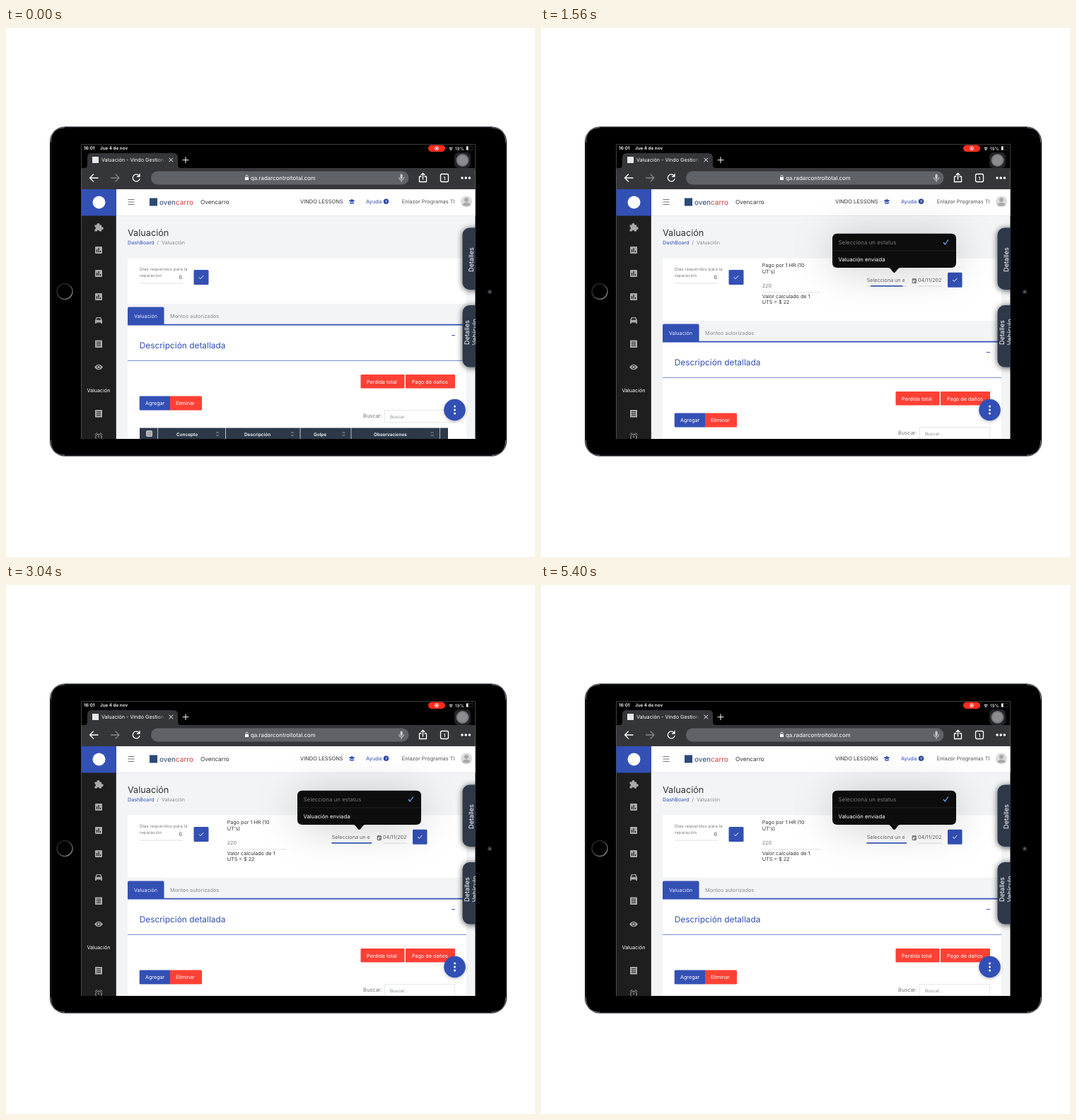
Animation of 748 by 748 pixels, one loop 5480 ms. Source, as an HTML page:

```html
<!DOCTYPE html>
<html lang="es">
<head>
<meta charset="utf-8">
<title>Valuación</title>
<style>
html, body { margin: 0; width: 100%; height: 100%; overflow: hidden; background: #fff; }
svg { display: block; width: 100vw; height: 100vh; }
text {
  font-family: Inter, "Liberation Sans", sans-serif;
  font-size: 7.2px; fill: #333; text-rendering: geometricPrecision; white-space: pre;
}
.b { font-weight: 600; }
.w { fill: #fff; }
.mute { fill: #8a8d92; }
.blue { fill: #3350b5; }
.red { fill: #ff4034; }
.small { font-size: 5.9px; letter-spacing: .15px; fill: #777; }
.th { font-size: 6.4px; font-weight: 600; fill: #fff; }
.nav { font-size: 7.5px; }
.rule { stroke: #d5d7da; stroke-width: .8; }
.ln { fill: none; stroke: #fff; stroke-width: 1.3; stroke-linecap: round; stroke-linejoin: round; }
.thin { stroke-width: 1; }

/* One loop: fields load at 320 ms, the menu opens at 1400 ms */
.low, .extra, .pop, .focus { animation: 5.48s linear infinite; }
.low { animation-name: push; animation-timing-function: step-end; }
.extra { animation-name: load; animation-timing-function: step-end; }
.pop { animation-name: open; }
.focus { animation-name: grow; transform-origin: 488.7px 365px; }
@keyframes push { 0% { transform: none; } 5.84%, 100% { transform: translateY(24px); } }
@keyframes load { 0% { opacity: 0; } 5.84%, 100% { opacity: 1; } }
@keyframes open { 0%, 25.55% { opacity: 0; } 27.5%, 100% { opacity: 1; } }
@keyframes grow {
  0%, 24.8% { transform: scaleX(0); animation-timing-function: ease-out; }
  30.8%, 100% { transform: scaleX(1); }
}
</style>
</head>
<body>
<svg viewBox="0 0 748 748">
  <defs>
    <clipPath id="screen"><rect x="106.5" y="164.5" width="557" height="416.5"/></clipPath>
    <clipPath id="tabText"><rect x="134" y="178" width="91" height="18"/></clipPath>
    <clipPath id="dateText"><rect x="532" y="348" width="35" height="16"/></clipPath>
    <linearGradient id="tabFade">
      <stop offset="0" stop-color="#35363a" stop-opacity="0"/>
      <stop offset="1" stop-color="#35363a"/>
    </linearGradient>
    <linearGradient id="ring" x1="0" y1="0" x2="1" y2="1">
      <stop offset="0" stop-color="#222"/><stop offset=".5" stop-color="#444"/>
      <stop offset="1" stop-color="#aaa"/>
    </linearGradient>
    <filter id="soft" x="-70%" y="-220%" width="240%" height="540%">
      <feDropShadow dx="0" dy="4" stdDeviation="28" flood-color="#000" flood-opacity=".2"/>
    </filter>
    <filter id="near" x="-80%" y="-30%" width="260%" height="160%">
      <feDropShadow dx="0" dy="1" stdDeviation="4" flood-color="#000" flood-opacity=".7"/>
    </filter>
    <filter id="lift" x="-50%" y="-50%" width="200%" height="200%">
      <feDropShadow dx="0" dy="1.5" stdDeviation="2" flood-color="#000" flood-opacity=".25"/>
    </filter>
    <g id="bars">
      <rect x="-5" y="-5" width="10" height="10" rx="1" fill="#aaa"/>
      <path d="M-2.5 3V-1M0 3V-3M2.5 3V1" stroke="#1e1e1e" stroke-width="1.2"/>
    </g>
    <g id="list">
      <rect x="-5" y="-5" width="10" height="10.5" fill="#aaa"/>
      <path d="M-3-2.3H3M-3 .2H3M-3 2.7H3" stroke="#1e1e1e" stroke-width="1"/>
    </g>
    <path id="tick" d="M-3 0L-1 2.2L3.2-2.3" fill="none" stroke="#fff" stroke-width="1"/>
    <path id="sort" d="M-1.7-1L0-3L1.7-1M-1.7 1L0 3L1.7 1" fill="none" stroke="#9aa4b2" stroke-width=".9"/>
  </defs>

  <!-- Tablet -->
  <rect x="62" y="139.5" width="646" height="466" rx="21" fill="#000"/>
  <rect x="63.3" y="140.8" width="643.4" height="463.4" rx="20" fill="none" stroke="#20242c" stroke-width="1"/>
  <path d="M63.3 162Q63.3 140.8 83 140.8M687 140.8Q706.7 140.8 706.7 162M63.3 583Q63.3 604.2 83 604.2M687 604.2Q706.7 604.2 706.7 583" fill="none" stroke="#8f97a5" stroke-width=".9"/>
  <circle cx="83" cy="372.5" r="11" fill="#000" stroke="url(#ring)" stroke-width="1.2"/>
  <circle cx="684" cy="373" r="3" fill="#30343c"/>
  <circle cx="684" cy="373" r="1.2" fill="#59606d"/>

  <g clip-path="url(#screen)">
    <rect x="106" y="164" width="558" height="417" fill="#f2f4f6"/>

    <!-- Browser -->
    <rect x="106" y="164" width="558" height="36" fill="#000"/>
    <path d="M106 198H111Q115 198 115 193V183Q115 177 121 177H237Q243 177 243 183V193Q243 198 247 198H664V228H106Z" fill="#35363a"/>
    <text class="w b" x="110" y="172.3" style="font-size:6.3px">16:01</text>
    <text class="w b" x="133" y="172.3" style="font-size:6.3px">Jue 4 de nov</text>
    <rect x="597" y="165.5" width="24" height="9.5" rx="4.7" fill="#ff2c20"/>
    <circle cx="609" cy="170.2" r="2.6" fill="none" stroke="#fff" stroke-width=".8"/>
    <circle cx="609" cy="170.2" r="1.2" fill="#fff"/>
    <path class="ln thin" d="M626.7 169.8Q629 167.8 631.3 169.8M627.8 171.3Q629 170.3 630.2 171.3"/>
    <circle cx="629" cy="172.4" r=".7" fill="#fff"/>
    <text class="w" x="635" y="172.5" style="font-size:6.4px">19%</text>
    <rect x="650.5" y="167.5" width="10" height="5" rx="1.2" fill="none" stroke="#444" stroke-width=".6"/>
    <rect x="651" y="167.5" width="2.6" height="5" fill="#fff"/>
    <rect x="122" y="182" width="9" height="9" fill="#e8e8e8"/>
    <g clip-path="url(#tabText)"><text class="w" x="135" y="189.3">Valuación - Vindo Gestion</text></g>
    <rect x="213" y="179" width="13" height="16" fill="url(#tabFade)"/>
    <path class="ln thin" d="M230.8 184L235.8 189M235.8 184L230.8 189M250 186.7H258M254 182.7V190.7"/>
    <rect x="634" y="176" width="23" height="22" rx="6" fill="#24252a"/>
    <circle cx="645.5" cy="187" r="9" fill="#77777b"/>
    <circle cx="645.5" cy="187" r="7" fill="#8c8c90"/>
    <path class="ln" d="M130 212H118.5M123.5 207L118.5 212L123.5 217"/>
    <path class="ln" d="M148.5 212H160M155 207L160 212L155 217" style="stroke:#85868a"/>
    <path class="ln" d="M188.3 209A5 5 0 1 0 189 213.5M189 206.5V210H185.5"/>
    <rect x="205" y="202.5" width="364.5" height="19" rx="9.5" fill="#5f6368"/>
    <rect x="338" y="211" width="5" height="4" rx=".6" fill="#fff"/>
    <path class="ln" d="M339 211V209.7A1.5 1.5 0 0 1 342 209.7V211" style="stroke-width:.8"/>
    <text class="w" x="346" y="214.8" style="font-size:7.9px">qa.radarcontroltotal.com</text>
    <rect x="557.5" y="206.5" width="3.2" height="7" rx="1.6" fill="#c9cbce"/>
    <path class="ln thin" d="M555.5 211.5A3.6 3.6 0 0 0 562.7 211.5M559.1 215.2V217.5" style="stroke:#c9cbce"/>
    <path class="ln" d="M587 210H584.5V217.5H594.5V210H592M589.5 214V205.5M587 207.8L589.5 205.3L592 207.8"/>
    <rect class="ln" x="614.5" y="206.5" width="11" height="11" rx="2"/>
    <text class="w b" x="620" y="214.5" text-anchor="middle" style="font-size:6.6px">1</text>
    <g fill="#fff"><circle cx="645" cy="212" r="1.8"/><circle cx="650.2" cy="212" r="1.8"/><circle cx="655.4" cy="212" r="1.8"/></g>

    <!-- Page header -->
    <rect x="155" y="228" width="509" height="37" fill="#fff"/>
    <path d="M155 265.4H664" stroke="#e3e5e8" stroke-width=".8"/>
    <path d="M172.5 242.5H181.5M172.5 246H181.5M172.5 249.5H181.5" stroke="#666" stroke-width=".9"/>
    <rect x="203" y="240.5" width="11" height="11" fill="#2b4a78"/>
    <text x="217" y="249.6" style="font-size:10px;fill:#27406f">oven<tspan fill="#d33a3a">carro</tspan></text>
    <text x="275" y="248.6" style="font-size:8.2px">Ovencarro</text>
    <text class="nav" x="416" y="248.4">VINDO LESSONS</text>
    <path d="M484.5 244.2L489 242L493.5 244.2L489 246.4ZM486 246V248Q489 249.6 492 248V246L489 247.5Z" fill="#3350b5"/>
    <text class="nav blue" x="509" y="248.4">Ayuda</text>
    <circle cx="537.5" cy="245.3" r="3.7" fill="#2d479f"/>
    <text class="w b" x="537.5" y="247.5" text-anchor="middle" style="font-size:5.8px">?</text>
    <text x="634.5" y="248.4" text-anchor="end" style="font-size:7.4px;fill:#555">Enlazor Programas TI</text>
    <circle cx="651" cy="245.5" r="8" fill="#dcdcdc"/>
    <circle cx="651" cy="243" r="3" fill="#a9a9a9"/>
    <path d="M645.5 250.5Q646 246.7 651 246.7T656.5 250.5Q651 253 645.5 250.5" fill="#a9a9a9"/>

    <!-- Side menu -->
    <rect x="106" y="228" width="49.8" height="353" fill="#1e1e1e"/>
    <rect x="106" y="228" width="49.8" height="37.5" fill="#3350b5"/>
    <circle cx="131.5" cy="246.5" r="9" fill="#fff"/>
    <path d="M125.5 278.5H128.5A2 2 0 1 1 132.3 278.5H135V281.3A2 2 0 1 1 135 285V287.5H132.2A2 2 0 0 0 128.4 287.5H125.5V284.8A2 2 0 0 0 125.5 281Z" fill="#aaa"/>
    <use href="#bars" x="131" y="314"/><use href="#bars" x="131" y="347"/><use href="#bars" x="131" y="380"/>
    <path d="M126 418V413.5L127.8 409H134.2L136 413.5V418H134.2V416.5H127.8V418Z" fill="#aaa"/>
    <path d="M127.8 412.8L128.7 410.3H133.3L134.2 412.8Z" fill="#1e1e1e"/>
    <use href="#list" x="131" y="446.5"/>
    <path d="M125 479.5Q131 471.8 137 479.5Q131 487.2 125 479.5Z" fill="#aaa"/>
    <circle cx="131" cy="479.5" r="2.2" fill="none" stroke="#1e1e1e" stroke-width="1"/>
    <text class="w" x="131" y="515" text-anchor="middle">Valuación</text>
    <use href="#list" x="131" y="545"/>
    <circle class="ln thin" cx="131" cy="578.5" r="4.3" style="stroke:#aaa"/>
    <path class="ln thin" d="M126 574.7L128.5 572.7M136 574.7L133.5 572.7M131 576V579" style="stroke:#aaa"/>

    <!-- Summary panel -->
    <text x="172" y="293.5" style="font-size:12.7px">Valuación</text>
    <text class="blue" x="172" y="305.8">DashBoard</text>
    <text class="mute" x="213.5" y="305.8">/</text>
    <text class="mute" x="220" y="305.8">Valuación</text>
    <rect x="172" y="325.5" width="479" height="64.5" fill="#fff"/>

    <!-- Detail area, pushed down when the fields load -->
    <g class="low">
      <rect x="172" y="360" width="479" height="30" fill="#fff"/>
      <rect x="172" y="420" width="479" height="170" fill="#fff"/>
      <path d="M172 419.6H651" stroke="#3350b5" stroke-width="1.7"/>
      <path d="M172 396.5Q172 394.5 174 394.5H221.5Q223.5 394.5 223.5 396.5V420H172Z" fill="#3350b5"/>
      <text x="181" y="409.5" style="fill:#e3e8fa">Valuación</text>
      <text class="mute" x="232" y="409.7" style="font-size:7.4px">Montos autorizados</text>
      <path d="M630 434.6H635" stroke="#3350b5" stroke-width="1"/>
      <text class="blue" x="188.7" y="453" style="font-size:11.9px">Descripción detallada</text>
      <path d="M172 470.4H651" stroke="#8b9cd6" stroke-width="1.1"/>
      <rect class="red" x="501.5" y="490" width="62" height="19.5" rx="1.2"/>
      <rect class="red" x="565" y="490" width="70" height="19.5" rx="1.2"/>
      <text class="w" x="510" y="502.5">Perdida total</text>
      <text class="w" x="574" y="502.5">Pago de daños</text>
      <path class="blue" d="M190 520.5H232V540.5H190Q188.7 540.5 188.7 539V522Q188.7 520.5 190 520.5Z"/>
      <path class="red" d="M232 520.5H275.5Q277 520.5 277 522V539Q277 540.5 275.5 540.5H232Z"/>
      <text class="w" x="197" y="533">Agregar</text>
      <text class="w" x="240" y="533">Eliminar</text>
      <text x="505" y="551.3" style="font-size:7.5px;fill:#777">Buscar:</text>
      <rect x="535.5" y="540.5" width="99" height="17" fill="#fff" stroke="#dfe1e4" stroke-width=".8"/>
      <text class="mute" x="543" y="551.5" style="font-size:6.3px">Buscar...</text>
      <rect x="189" y="565.5" width="436" height="18" fill="#2d3949"/>
      <path d="M214.5 565.5V583M310.5 565.5V583M416 565.5V583M488 565.5V583M613.5 565.5V583" stroke="#dfe3e8" stroke-width=".8"/>
      <rect x="198.5" y="569.5" width="8" height="8" rx="1.5" fill="#aaa" stroke="#e5e5e5" stroke-width=".8"/>
      <text class="th" x="241" y="576.8">Concepto</text>
      <text class="th" x="337" y="576.8">Descripción</text>
      <text class="th" x="435" y="576.8">Golpe</text>
      <text class="th" x="520" y="576.8">Observaciones</text>
      <use href="#sort" x="299" y="574"/><use href="#sort" x="405" y="574"/>
      <use href="#sort" x="477.5" y="574"/><use href="#sort" x="602.5" y="574"/>
    </g>

    <text class="small" x="189" y="342.7">Días requeridos para la</text>
    <text class="small" x="189" y="352.3">reparación</text>
    <text x="244.4" y="355.3" style="font-size:7.7px;fill:#666">6</text>
    <path class="rule" d="M189 361H250"/>
    <rect class="blue" x="265.5" y="342" width="21" height="21" rx="1.5"/>
    <use href="#tick" x="276" y="352.5"/>

    <g class="extra">
      <text x="312.7" y="338.3">Pago por 1 HR (10</text>
      <text x="312.7" y="347">UT's)</text>
      <text x="312.7" y="367.3" style="fill:#777">220</text>
      <path class="rule" d="M313 373.8H395"/>
      <text x="312.7" y="381.8">Valor calculado de 1</text>
      <text x="312.7" y="390.3">UTS = $ 22</text>
      <text x="460.7" y="338.5" style="font-size:7.5px">Añadir estatus</text>
      <text x="460.7" y="358.8" style="fill:#666">Selecciona un e</text>
      <path class="rule" d="M460.5 365H517M533 365H567"/>
      <path d="M525.2 355H530.3V360.5H525.2ZM525.2 356.2H530.3M526.5 353.8V355M529 353.8V355" fill="none" stroke="#444" stroke-width=".8"/>
      <rect x="528" y="358" width="1.6" height="1.6" fill="#333"/>
      <g clip-path="url(#dateText)"><text x="533" y="358.8" style="fill:#666">04/11/2021</text></g>
      <rect class="blue" x="575" y="345.7" width="20.5" height="21" rx="1.5"/>
      <use href="#tick" x="585.2" y="356.2"/>
    </g>
    <rect class="focus blue" x="460.3" y="364" width="56.8" height="1.6"/>

    <!-- Floating controls -->
    <g filter="url(#near)">
      <rect x="645.5" y="282.5" width="40" height="87.5" rx="10" fill="#2d3949"/>
      <rect x="645.5" y="392" width="40" height="87.5" rx="10" fill="#2d3949"/>
    </g>
    <g style="font-size:9.2px">
      <text class="w" transform="translate(660.5 345)rotate(-90)" style="font-size:inherit">Detalles</text>
      <text class="w" transform="translate(654.7 448)rotate(-90)" style="font-size:inherit">Detalles</text>
      <text class="w" transform="translate(666 448.5)rotate(-90)" style="font-size:inherit">Vehículo</text>
    </g>
    <circle class="blue" cx="634.5" cy="540" r="15.3" filter="url(#lift)"/>
    <g fill="#fff"><circle cx="634.5" cy="535" r="1.5"/><circle cx="634.5" cy="540" r="1.5"/><circle cx="634.5" cy="545" r="1.5"/></g>

    <!-- Status menu -->
    <g class="pop">
      <path d="M419 290.7H580Q587 290.7 587 297.7V332Q587 339 580 339H508C504 339 502 346 499.5 346S495 339 491 339H419Q412 339 412 332V297.7Q412 290.7 419 290.7Z" fill="#0c0c0d" filter="url(#soft)"/>
      <path d="M412 314.9H587" stroke="#29292b" stroke-width=".7"/>
      <text x="420.5" y="305.8" style="font-size:7.9px;fill:#77777b">Selecciona un estatus</text>
      <text class="w" x="420.5" y="330" style="font-size:7.7px">Valuación enviada</text>
      <path class="ln" d="M569.3 303.5L571.3 306L575.5 299.8" style="stroke:#6a9cf5"/>
    </g>
  </g>
</svg>
</body>
</html>
```
